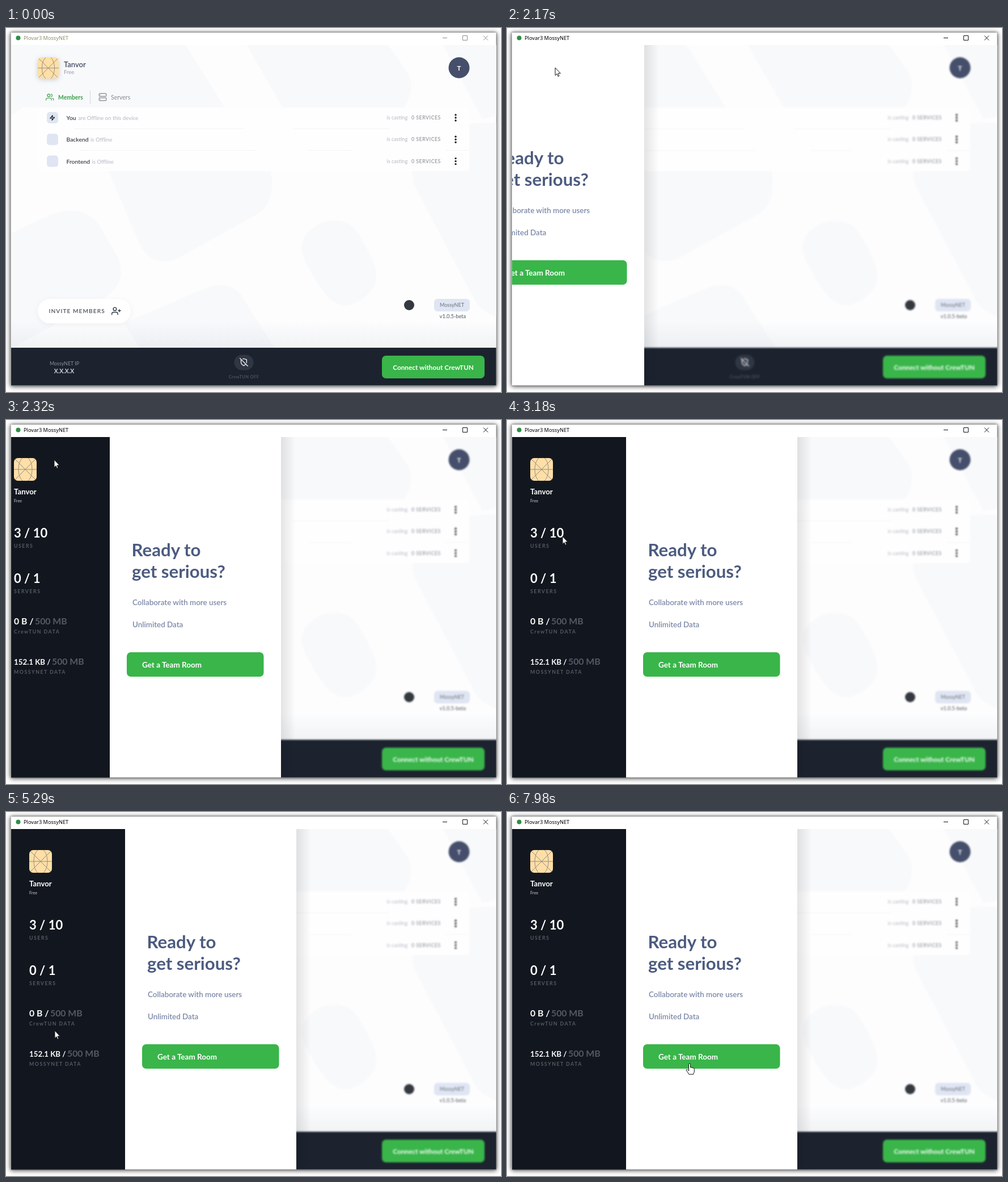
An HTML page that plays this animation: 873x641 px, repeating every 8000 ms.

```html
<!DOCTYPE html>
<html lang="en">
<head>
<meta charset="utf-8">
<title>Room panel</title>
<style>
  html, body { margin: 0; width: 100%; height: 100%; overflow: hidden; background: #fff; }
  svg { display: block; }
  text { font-family: Lato, sans-serif; white-space: pre; }
  .window { fill: #fff; filter: drop-shadow(0 0 1px #444) drop-shadow(0 1px 4px rgba(0, 0, 0, .75)); }
  .title { font: 9.2px "Noto Sans", sans-serif; }
  .icon { fill: none; stroke-width: 2; stroke-linecap: round; stroke-linejoin: round; }
  .mid { text-anchor: middle; }
  .bold { font-weight: 700; }
  .semi { font-weight: 600; }
  .medium { font-weight: 500; }
  .green { fill: #39b54a; }
  .tile { fill: #dfe5f2; }
  .lift { filter: drop-shadow(0 2px 4px rgba(60, 70, 100, .25)); }
  .soft { filter: drop-shadow(0 2px 5px rgba(60, 70, 100, .07)); }
  .pattern { fill: #f8f9fb; }
  .label { font-size: 8.8px; font-weight: 700; letter-spacing: 1.5px; fill: #555a62; }
  .stat { font-size: 22px; font-weight: 700; fill: #fff; }
  .quota { font-size: 15.8px; font-weight: 700; fill: #555a62; }
  .pitch { font-size: 31.2px; font-weight: 700; fill: #4c5b80; }
  .perk { font-size: 13.4px; font-weight: 600; fill: #7c88a8; }
</style>
</head>
<body>
<svg width="873" height="641" viewBox="0 0 873 641">
  <defs>
    <clipPath id="body"><rect x="9" y="30" width="855.5" height="599.5"/></clipPath>
    <clipPath id="round"><rect width="40" height="40" rx="7"/></clipPath>
    <linearGradient id="edge"><stop stop-opacity=".1"/><stop offset="1" stop-opacity="0"/></linearGradient>
    <linearGradient id="floor" x2="0" y2="1">
      <stop stop-color="#33506a" stop-opacity="0"/><stop offset="1" stop-color="#33506a" stop-opacity=".06"/>
    </linearGradient>
    <g id="avatar" clip-path="url(#round)">
      <rect width="40" height="40" fill="#ffdfa6"/>
      <g fill="none" stroke="#948a80">
        <path d="M0 20H40M0 0L40 40M40 0L0 40"/>
        <ellipse cx="20" cy="20" rx="12" ry="22"/>
      </g>
    </g>
  </defs>

  <rect class="window" x="8.5" y="8" width="856" height="621.5"/>
  <circle cx="21.5" cy="17.5" r="4" fill="#2f8f45"/>
  <text id="title" class="title" x="31" y="21">Plovar3 MossyNET</text>
  <path id="controls" fill="none" d="M770 17.5h8M805.5 13.5h8v8h-8zM842 13.5l8 8M850 13.5l-8 8"/>

  <g clip-path="url(#body)">
    <g id="main">
      <rect x="-10" y="10" width="900" height="640" fill="#fdfdfe"/>
      <g class="pattern">
        <path d="M-10 10H304L386 140H30L-10 165Z"/>
        <path d="M413 10H660L708 78Q724 106 702 140H488Z"/>
        <path d="M760 10H890V150L840 160Z"/>
        <path d="M890 165L750 172Q705 205 719 275L828 482Q842 505 890 516Z"/>
        <path d="M180 250L232 372Q252 424 300 407L445 327Q476 306 467 252Z"/>
        <path d="M535 357Q570 328 605 345Q622 355 648 412Q662 448 637 470Q600 502 572 478Q556 464 527 410Q513 378 535 357Z"/>
        <path d="M-10 370L80 328Q138 308 166 350L196 402Q216 444 178 472L-10 575Z"/>
        <path d="M208 520L345 461Q400 436 424 485L478 570H240Z"/>
      </g>
      <rect x="-10" y="515" width="900" height="48" fill="url(#floor)"/>

      <g class="lift"><use href="#avatar" transform="translate(56 52)scale(.925)"/></g>
      <text class="semi" x="102" y="69" font-size="13" fill="#414b61">Tanvor</text>
      <text x="102" y="81" font-size="9.6" fill="#9a9da5">Free</text>
      <circle cx="799" cy="70" r="18.5" fill="#454f6b"/>
      <text class="mid bold" x="799" y="74.5" font-size="11.5" fill="#fff">T</text>

      <g class="icon" stroke="#39a04a" transform="translate(70 114.5)scale(.6)">
        <path d="M17 21v-2a4 4 0 0 0-4-4H5a4 4 0 0 0-4 4v2M23 21v-2a4 4 0 0 0-3-3.9M16 3.1a4 4 0 0 1 0 7.8"/><circle cx="9" cy="7" r="4"/>
      </g>
      <text class="bold" x="92" y="125.5" font-size="10.4" fill="#39a04a">Members</text>
      <path d="M148.5 110v23" stroke="#d4d6da"/>
      <g class="icon" stroke="#85878c" transform="translate(163 114)scale(.63)">
        <rect x="2" y="2" width="20" height="8" rx="2"/><rect x="2" y="14" width="20" height="8" rx="2"/><path d="M6 6h.1M6 18h.1"/>
      </g>
      <text x="185" y="125.5" font-size="10.5" fill="#85878c">Servers</text>

      <rect x="56" y="140" width="761" height="112" rx="6" fill="#fefeff"/>
      <path d="M120 177.5H420M506 177.5H676M130 215.5H440M534 215.5H610M775 215.5H816" stroke="#f2f3f6"/>
      <g id="rows"></g>
      <path d="M13 2L3 14h9l-1 8 10-12h-9z" fill="none" stroke="#111" stroke-width="2.6" stroke-linejoin="round" transform="translate(76.5 153)scale(.43)"/>

      <rect class="soft" x="56" y="477" width="164" height="43" rx="21" fill="#fff"/>
      <text class="semi" x="75.5" y="502" font-size="10.2" letter-spacing="1.05" fill="#4a505c">INVITE MEMBERS</text>
      <g class="icon" stroke="#2f3643" transform="translate(186 490)scale(.7)">
        <path d="M16 21v-2a4 4 0 0 0-4-4H5a4 4 0 0 0-4 4v2M20 8v6M23 11h-6"/><circle cx="8.5" cy="7" r="4"/>
      </g>

      <circle cx="711" cy="488" r="9" fill="#34383f"/>
      <rect class="tile" x="755" y="477" width="63" height="22" rx="6"/>
      <text class="mid" x="786.5" y="491" font-size="9" fill="#6b7180">MossyNET</text>
      <text class="mid" x="788" y="511" font-size="9.2" fill="#4f535b">v1.0.5-beta</text>

      <rect x="-10" y="563" width="900" height="90" fill="#1c232f"/>
      <text class="mid" x="103" y="593.5" font-size="8.9" fill="#8b909a">MossyNET IP</text>
      <text class="mid bold" x="102.5" y="608" font-size="10.4" fill="#d0d3d9">X.X.X.X</text>
      <rect x="402.5" y="575.5" width="34" height="27" rx="13.5" fill="#303744"/>
      <path class="icon" stroke="#fff" transform="translate(412 581)scale(.62)" d="M19.7 14a6.9 6.9 0 0 0 .3-2V5l-8-3-3.2 1.2M4.7 4.7L4 5v7c0 6 8 10 8 10a20 20 0 0 0 5.6-4.4M1 1l22 22"/>
      <text class="mid bold" x="419.5" y="616.5" font-size="7.5" letter-spacing=".4" fill="#4b525e">CrewTUN OFF</text>
      <rect class="green" x="663" y="577" width="181" height="40" rx="7"/>
      <text class="mid bold" x="753.5" y="601.5" font-size="11.8" fill="#fff">Connect without CrewTUN</text>
    </g>

    <g id="panel">
      <rect x="512" y="30" width="26" height="600" fill="url(#edge)"/>
      <rect x="210" y="30" width="302" height="600" fill="#fff"/>
      <rect x="8" y="30" width="202" height="600" fill="#12171f"/>
      <use href="#avatar" x="41" y="67"/>
      <text class="bold" x="41" y="131" font-size="13.2" fill="#fff">Tanvor</text>
      <text x="41" y="145" font-size="7.4" fill="#c3c6cc">Free</text>
      <text class="stat" x="41" y="207">3 / 10</text>
      <text class="label" x="41" y="225">USERS</text>
      <text class="stat" x="41" y="287">0 / 1</text>
      <text class="label" x="41" y="304.5">SERVERS</text>
      <text class="bold" x="41" y="360" font-size="15.8" fill="#fff">0 B /</text>
      <text class="quota" x="78" y="360">500 MB</text>
      <text class="label" x="41" y="375.5">CrewTUN DATA</text>
      <text class="bold" x="41" y="431" font-size="13.3" fill="#fff">152.1 KB /</text>
      <text class="quota" x="108" y="431">500 MB</text>
      <text class="label" x="41" y="446.5">MOSSYNET DATA</text>
      <text class="pitch" x="248.5" y="239.5">Ready to</text>
      <text class="pitch" x="249" y="278">get serious?</text>
      <text class="perk" x="250" y="326">Collaborate with more users</text>
      <text class="perk" x="250" y="365">Unlimited Data</text>
      <rect class="green" x="240" y="409" width="241.5" height="43" rx="7"/>
      <text class="bold" x="267" y="435.5" font-size="13.5" fill="#fff">Get a Team Room</text>
    </g>
  </g>

  <g id="cursor" fill="#fff" stroke="#111" stroke-linejoin="round">
    <path id="arrow" d="M0 0V13.5L3 10.7 5 15.3 7 14.4 5 9.9H9.3Z"/>
    <path id="hand" d="M-1.5 1.5a1.5 1.5 0 0 1 3 0V7q1.5-1 2.5.4q1.4-.7 2.2.6q2-.3 2.1 1.5V14q0 2-1.5 3.4V19H-1q-1.4-2.6-4.5-6.6q-.8-1.8.8-2.1q1.2 0 3.2 2.3z"/>
  </g>
</svg>
<script>
const $ = id => document.getElementById(id);
const LOOP = 8000, FOCUS = 2030, BLUR = 2100;

const members = [['You', 'are Offline on this device', 127], ['Backend', 'is Offline', 149], ['Frontend', 'is Offline', 151.5]];
$('rows').innerHTML = members.map(([name, status, x], i) => {
  const y = 158 + i * 38.3;
  const dots = [-5, 0, 5].map(d => `<circle cx="793" cy="${y + d}" r="1.7" fill="#222"/>`).join('');
  return `<rect class="tile" x="72" y="${y - 10}" width="20" height="20" rx="5"/>
    <text class="medium" x="106.5" y="${y + 4}" font-size="10.4" fill="#2b303b">${name}</text>
    <text x="${x}" y="${y + 4}" font-size="9.7" fill="#b4b8c2">${status}</text>
    <text x="671.5" y="${y + 3}" font-size="9.1" fill="#b4b7c0">is casting</text>
    <text class="semi" x="715" y="${y + 3}" font-size="8.8" letter-spacing=".5" fill="#96999f">0 SERVICES</text>${dots}`;
}).join('');

// Bursts of pointer movement: start, end, number of steps
const bursts = [
  [70, 840, 11], [920, 920, 1], [2030, 2790, 11], [2870, 3320, 7], [3470, 3560, 2], [3710, 4510, 11],
  [4600, 5360, 11], [5440, 5750, 5], [5900, 5900, 1], [6220, 6270, 2], [6500, 7280, 11], [7420, 7590, 3], [7830, 7980, 3]
];
// Pointer path: time, x, y
const path = [
  [70, 508, 613], [455, 285, 330], [840, 83, 74], [920, 86, 70], [2030, 85, 70], [2400, 85, 70],
  [2790, 128, 160], [2945, 147, 202], [3020, 140, 224], [3170, 98, 205], [3320, 46, 206], [3560, 50, 205],
  [3630, 50, 205], [4510, 100, 342], [4904, 109, 398], [5056, 105, 409], [5284, 86, 385], [5360, 76, 367],
  [5750, 62, 357], [5900, 60, 356], [6150, 60, 356], [6270, 55, 354], [6420, 55, 354],
  [7280, 157, 449], [7335, 157, 449], [7590, 320, 506], [7755, 320, 506], [7980, 322, 443]
];
const slideTimes = [2030, 2100, 2170, 2270, 2320, 2400, 2460];

function snap(t) {
  const burst = bursts.filter(b => b[0] <= t).pop();
  if (!burst) return 0;
  const [start, end, steps] = burst;
  if (t >= end) return end;
  const step = (end - start) / (steps - 1);
  return start + Math.floor((t - start) / step + 1e-6) * step;
}

function pointer(t) {
  const i = path.findIndex(p => p[0] >= t);
  if (i <= 0) return path[0].slice(1);
  const [t0, x0, y0] = path[i - 1], [t1, x1, y1] = path[i];
  const k = (t - t0) / (t1 - t0);
  return [x0 + (x1 - x0) * k, y0 + (y1 - y0) * k];
}

function slide(t) {
  const held = slideTimes.filter(s => s <= t).pop() || 0;
  const u = Math.min(1, Math.max(0, (held - 2105) / 346));
  return Math.round(-504 * (1 - u) ** 3);
}

function draw(t) {
  const focused = t >= FOCUS;
  $('title').setAttribute('fill', focused ? '#000' : '#8f8e6c');
  $('controls').setAttribute('stroke', focused ? '#111' : '#8c8c8c');
  $('main').style.filter = t >= BLUR ? 'blur(1.5px)' : 'none';
  $('panel').setAttribute('transform', `translate(${slide(t)} 0)`);
  $('panel').style.display = t >= BLUR + 70 ? '' : 'none';

  const [x, y] = pointer(snap(t));
  const overLink = (t >= 840 && t < FOCUS) || (t >= 7830 && y < 452);
  $('cursor').style.display = t < 70 ? 'none' : '';
  $('cursor').setAttribute('transform', `translate(${Math.round(x)} ${Math.round(y)})`);
  $('hand').style.display = overLink ? '' : 'none';
  $('arrow').style.display = overLink ? 'none' : '';
}

function tick() {
  draw(performance.now() % LOOP);
  requestAnimationFrame(tick);
}
tick();
</script>
</body>
</html>
```
